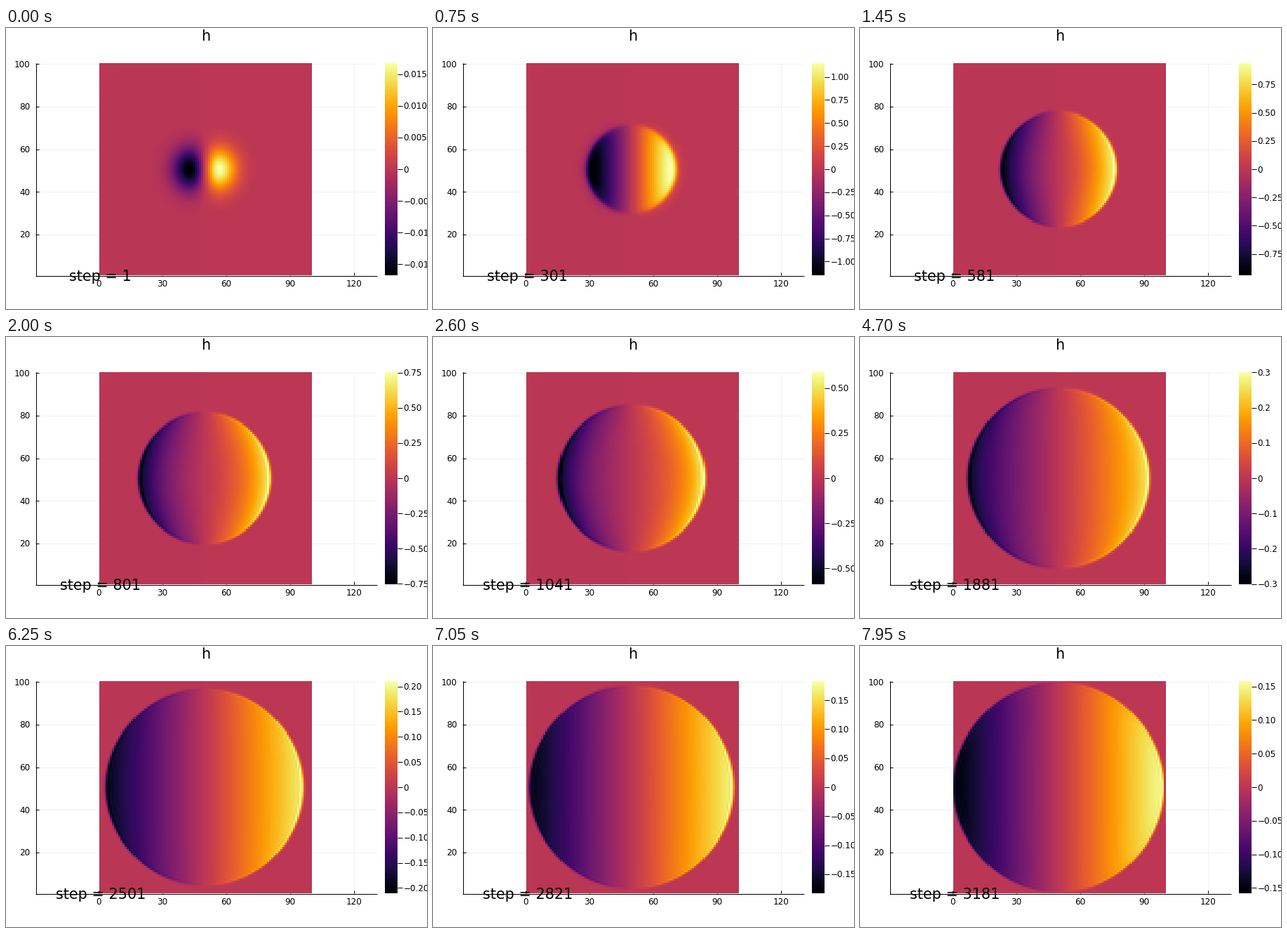
Write a matplotlib script that moves like this. It is 600 px wide and 400 px high and loops after 8000 ms.

```python
import math

import numpy as np
import matplotlib.pyplot as plt
from matplotlib.animation import FuncAnimation

plt.rcParams["font.family"] = "DejaVu Sans"

W, H, DPI = 600, 400, 100
FRAMES, INTERVAL, STRIDE = 160, 50, 20
N, G, DT, DRAG = 100, 9.81, 0.02, 0.2
LEFT, RIGHT, TOP, BOTTOM = 133, 436, 50, 352
MID, HALF = 201, 151


def simulate():
    """Shallow water drop with drag on a staggered grid; x velocity per frame."""
    c = np.arange(1, N + 1) - (N + 1) / 2
    h = np.exp(-(c[None, :] ** 2 + c[:, None] ** 2) / 100)
    u = np.zeros((N, N + 1))
    v = np.zeros((N + 1, N))
    fx, fy = np.zeros_like(u), np.zeros_like(v)
    ui, vi = u[:, 1:-1], v[1:-1]
    shots = []
    for step in range((FRAMES - 1) * STRIDE + 1):
        ui -= DT * (G * (h[:, 1:] - h[:, :-1]) + DRAG * ui)
        vi -= DT * (G * (h[1:] - h[:-1]) + DRAG * vi)
        fx[:, 1:-1] = ui * np.where(ui > 0, h[:, :-1], h[:, 1:])
        fy[1:-1] = vi * np.where(vi > 0, h[:-1], h[1:])
        h -= DT * (fx[:, 1:] - fx[:, :-1] + fy[1:] - fy[:-1])
        if step % STRIDE == 0:
            shots.append(u[:, 1:].copy())
    return shots


def tick_step(span):
    power = math.floor(math.log10(span))
    lead = span / 10 ** power
    unit = 1 if lead > 5 else 0.5 if lead > 2.5 else 0.25
    digits = max(0, -power + (0 if unit == 1 else 1 if unit == 0.5 else 2))
    return unit * 10 ** power, digits


def px(points):
    return points * 72 / DPI


fields = simulate()

fig = plt.figure(figsize=(W / DPI, H / DPI), dpi=DPI, facecolor="white")
ax = fig.add_axes([0, 0, 1, 1])
ax.axis("off")


def line(xs, ys, color="black", width=1.0, z=3):
    return ax.plot(xs, ys, color=color, lw=px(width), zorder=z,
                   solid_capstyle="butt")[0]


def label(x, y, text, size=12, ha="center", va="center_baseline"):
    return ax.text(x, y, text, fontsize=px(size), ha=ha, va=va, zorder=5)


for value in range(0, 121, 30):
    x = 132 + value * 3.033
    line([x, x], [TOP, BOTTOM], "#f0f0f0", z=0)
    line([x, x], [348, BOTTOM], z=1)
    label(x, 368.5, str(value), va="baseline")
for value in range(20, 101, 20):
    y = 354.6 - value * 3.033
    line([42, 528], [y, y], "#f0f0f0", z=0)
    line([42, 46.5], [y, y], z=1)
    label(34.5, y + 4.5, str(value), ha="right", va="baseline")
line([42.5, 42.5], [TOP, BOTTOM + 1])
line([42, 528.5], [352.5, 352.5])

heat = ax.imshow(fields[0], cmap="inferno", origin="lower", aspect="auto",
                 interpolation="nearest", zorder=2,
                 extent=(LEFT, RIGHT, BOTTOM, TOP))
ax.imshow(np.linspace(1, 0, 256)[:, None], cmap="inferno", aspect="auto",
          interpolation="nearest", zorder=2, extent=(540, 558, BOTTOM, TOP))
ax.set_xlim(0, W)
ax.set_ylim(H, 0)

label(285, 18, "h", 20.8, va="baseline")
caption = label(134.7, 359.5, "", 20.8, va="baseline")
marks = [(line([557.5, 564.5], [0, 0]), label(566.5, 0, "", ha="left", va="baseline"))
         for _ in range(11)]


def draw(frame):
    field = fields[frame]
    peak = np.abs(field).max()
    heat.set_data(field)
    heat.set_clim(-peak, peak)
    caption.set_text(f"step = {frame * STRIDE + 1}")
    gap, digits = tick_step(2 * peak)
    for k, (tick, text) in zip(range(-5, 6), marks):
        value = k * gap
        shown = abs(value) <= peak
        y = MID - HALF * value / peak
        tick.set_visible(shown)
        text.set_visible(shown)
        tick.set_ydata([y, y])
        text.set_y(y + 4.5)
        text.set_text(f"{value:.{digits}f}".replace("-", "\u2212") if k else "0")
    return []


anim = FuncAnimation(fig, draw, frames=FRAMES, interval=INTERVAL,
                     init_func=lambda: [], repeat=True, repeat_delay=0, blit=False)
plt.show()
```
